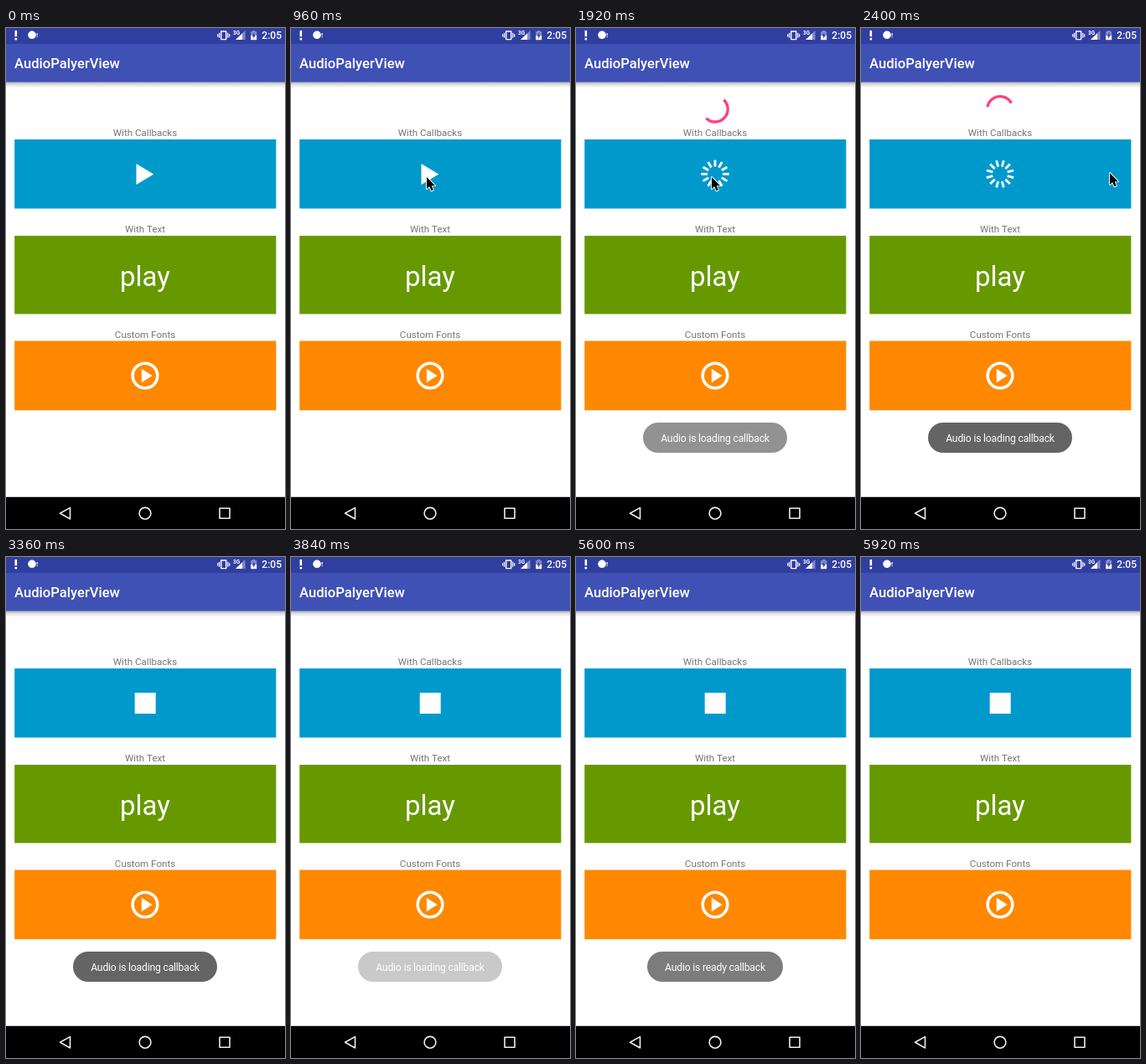
An HTML page with a canvas that plays this animation: 333 px wide and 598 px high, repeating every 8 s.

```html
<!DOCTYPE html>
<html lang="en">
<head>
<meta charset="utf-8">
<title>Audio player view</title>
<style>
  html, body { margin: 0; width: 100%; height: 100%; overflow: hidden; background: #fff; }
  canvas { display: block; width: 333px; height: 598px; }
</style>
</head>
<body>
<canvas id="stage"></canvas>
<script>
const W = 333, H = 598, LOOP = 8000, TICK = 160, TAU = Math.PI * 2;
const LOAD_START = 1600, LOAD_END = 3360;
const canvas = document.getElementById('stage');
const ctx = canvas.getContext('2d');
const ratio = window.devicePixelRatio || 1;
canvas.width = Math.round(W * ratio);
canvas.height = Math.round(H * ratio);

const rad = deg => deg * Math.PI / 180;
const clamp = x => Math.min(1, Math.max(0, x));

function rect(x, y, w, h, color) {
  ctx.fillStyle = color;
  ctx.fillRect(x, y, w, h);
}

function poly(points, fill, stroke, width) {
  ctx.beginPath();
  points.forEach(([x, y]) => ctx.lineTo(x, y));
  ctx.closePath();
  if (stroke) {
    ctx.strokeStyle = stroke;
    ctx.lineWidth = width;
    ctx.lineJoin = 'round';
    ctx.stroke();
  }
  if (fill) { ctx.fillStyle = fill; ctx.fill(); }
}

function playIcon(x, y, w, h) {
  poly([[x, y - h / 2], [x, y + h / 2], [x + w, y]], '#fff');
}

function arc(x, y, r, from, to, color, width) {
  ctx.beginPath();
  ctx.arc(x, y, r, from, to);
  ctx.strokeStyle = color;
  ctx.lineWidth = width;
  ctx.stroke();
}

function text(value, x, y, size, color, align = 'center', weight = 400, spacing = 0) {
  ctx.font = `${weight} ${size}px Roboto, sans-serif`;
  ctx.letterSpacing = spacing + 'px';
  ctx.textAlign = align;
  ctx.fillStyle = color;
  ctx.fillText(value, x, y);
}

function drawStatusBar() {
  const dim = 'rgba(255,255,255,.4)';
  rect(0, 0, W, 19, '#303f9f');
  rect(10.5, 3, 2.6, 7.2, '#fff');
  rect(10.5, 11.8, 2.6, 2.6, '#fff');
  ctx.beginPath();
  ctx.arc(31, 8.3, 4.8, 0, TAU);
  ctx.fill();
  rect(36.6, 6, 1.1, 3.2, '#fff');
  rect(36.6, 10, 1.1, 1.1, '#fff');

  // vibrate
  ctx.strokeStyle = '#fff';
  ctx.lineWidth = 1.4;
  ctx.strokeRect(256.7, 4, 6, 9.6);
  for (const side of [-1, 1]) {
    rect(259.1 + side * 5.1, 5.8, 1.2, 6, '#fff');
    rect(259.1 + side * 7, 7.2, 1.2, 3.4, '#fff');
  }

  // signal
  text('3G', 271, 8, 6.5, '#fff', 'left', 700);
  poly([[274, 14], [285.5, 14], [285.5, 3]], dim);
  poly([[274, 14], [282, 14], [282, 6.4]], '#fff');

  // battery
  rect(294, 3, 3.4, 1.4, dim);
  rect(292.2, 4.2, 7, 4.6, dim);
  rect(292.2, 8.8, 7, 5.4, '#fff');
  poly([[296.4, 5.2], [293.6, 9.8], [295.4, 9.8], [295, 13], [297.9, 8.4], [296.2, 8.4]], '#303f9f');
  text('2:05', 329, 13.3, 12, '#fff', 'right', 500);
}

function drawAppBar() {
  const shadow = ctx.createLinearGradient(0, 64.5, 0, 71.5);
  shadow.addColorStop(0, 'rgba(0,0,0,.32)');
  shadow.addColorStop(.4, 'rgba(0,0,0,.13)');
  shadow.addColorStop(1, 'rgba(0,0,0,0)');
  rect(0, 64.5, W, 7, shadow);
  rect(0, 19, W, 45.6, '#3f51b5');
  text('AudioPalyerView', 10, 47.8, 16.6, '#fff', 'left', 500);
}

function drawNavBar() {
  rect(0, 559.8, W, 39, '#000');
  poly([[64.5, 579.3], [76.5, 572.6], [76.5, 586]], null, '#eee', 1.6);
  arc(166, 579.3, 6.9, 0, TAU, '#eee', 1.6);
  ctx.strokeRect(255, 573.3, 12, 12);
}

function drawButton(label, y, h, color) {
  text(label, 166, y - 3.9, 11.6, '#757575');
  rect(10.2, y, 312.2, h, color);
}

function drawButtons() {
  drawButton('With Callbacks', 133, 82.5, '#0099cc');
  drawButton('With Text', 248, 93.4, '#669900');
  drawButton('Custom Fonts', 373.5, 82.8, '#ff8800');
  text('play', 166, 308, 33, '#fff');
  arc(166, 415, 14.8, 0, TAU, '#fff', 3.6);
  playIcon(161.8, 415, 12.8, 16.4);
}

function drawSpokes(t) {
  ctx.save();
  ctx.translate(166, 174.3);
  ctx.rotate((t - 1920) / 2304 * TAU);
  for (let i = 0; i < 12; i++) {
    rect(-1.4, -16.7, 2.8, 7.7, '#fff');
    ctx.rotate(TAU / 12);
  }
  ctx.restore();
}

// Fast-out ease that is complete at half of the cycle
function trim(x) {
  const u = clamp(x * 2);
  return 1 - (1 - u) ** 2 * (1 - u * u);
}

// The head runs ahead in the first half of a cycle, the tail catches up in the second
function drawRing(t) {
  const phase = (t - 1723) / 1074;
  const cycle = Math.floor(phase), p = phase - cycle;
  const base = -90 + 234 * phase + 270 * cycle;
  const from = base + 270 * trim(p - .5);
  const to = base + 270 * trim(p) + 5;
  arc(166, 96.8, 15.2, rad(from), rad(to), '#ff4081', 3.3);
}

// Time and tip of each resting place of the pointer
const cursorStops = [
  [480, 311, 185], [640, 181, 159], [800, 167, 167], [960, 161, 177], [2400, 296, 172]
];

function drawCursor(t) {
  if (t < 480 || t >= 2560) return;
  const [, x, y] = cursorStops.findLast(([start]) => t >= start);
  ctx.save();
  ctx.translate(x, y);
  poly([[1, 1], [1, 15], [4.2, 12.1], [6.5, 17.3], [8.9, 16.3], [6.7, 11.2], [11, 11.2]],
    '#000', '#fff', 1.8);
  ctx.restore();
}

function drawToast(message, width, t, start, end) {
  const alpha = clamp(Math.min(t - start, end - t) / 320);
  if (!alpha) return;
  ctx.beginPath();
  ctx.roundRect(166 - width / 2, 471, width, 36, 18);
  ctx.fillStyle = `rgba(100,100,100,${alpha})`;
  ctx.fill();
  text(message, 166, 494, 12.2, '#fdfdfd', 'center', 400, -.2);
}

function draw(t) {
  ctx.setTransform(ratio, 0, 0, ratio, 0, 0);
  rect(0, 0, W, H, '#fff');
  drawStatusBar();
  drawAppBar();
  drawButtons();
  drawNavBar();

  if (t < LOAD_START) {
    playIcon(155.5, 174.5, 20.8, 25);
  } else if (t < LOAD_END) {
    drawRing(t);
    drawSpokes(t);
  } else {
    rect(153.7, 162, 25, 25, '#fff');
  }

  drawToast('Audio is loading callback', 172, t, 1696, 3950);
  drawToast('Audio is ready callback', 162, t, 4000, 5870);
  drawCursor(t);
}

const origin = performance.now();
function frame() {
  const t = (performance.now() - origin) % LOOP;
  draw(Math.floor(t / TICK) * TICK);
  requestAnimationFrame(frame);
}
frame();
</script>
</body>
</html>
```
